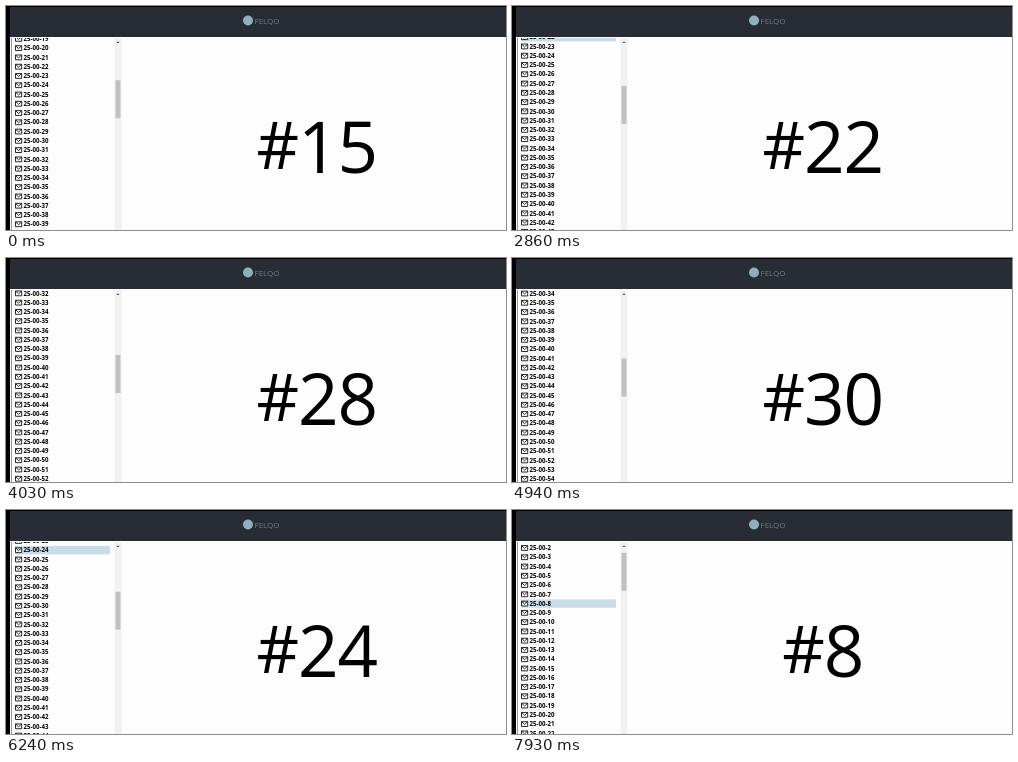
Recreate the animation shown at these times as an HTML page. Size 500 by 224 pixels, loop 8 s.

```html
<!DOCTYPE html>
<html lang="en">
<head>
<meta charset="utf-8">
<title>Numbered list browser</title>
<style>
  html, body { margin: 0; width: 100%; height: 100%; overflow: hidden; background: #000; }
  svg { display: block; width: 500px; height: 224px; }
  text { font-family: "Open Sans", "Noto Sans", sans-serif; }
  .row text { font-size: 6.1px; font-weight: 700; }
  .row path { fill: #fff; stroke: #111; stroke-width: .9; stroke-linejoin: round; }
  .big { font-size: 71px; letter-spacing: -1px; text-anchor: middle; }
  .hash { font-size: 66px; }
</style>
</head>
<body>
<svg viewBox="0 0 500 224">
  <defs>
    <clipPath id="pane"><rect x="4" y="32" width="104" height="192"/></clipPath>
  </defs>
  <rect width="500" height="224"/>
  <rect x="4" y="1" width="496" height="30" fill="#272c35"/>
  <circle cx="242" cy="14.5" r="5" fill="#8eb0ba"/>
  <text x="248.5" y="17.6" font-size="8" fill="#727b85">FELQO</text>

  <rect x="4" y="31" width="496" height="193" fill="#fdfdfd"/>
  <g clip-path="url(#pane)">
    <path d="M5.5 32V224" stroke="#a394a6"/>
    <g id="list">
      <path d="M5 33.5H106.5" stroke="#a394a6"/>
      <rect id="mark" x="9" width="95" height="8.4" fill="#c9dce9"/>
    </g>
  </g>

  <rect x="108.5" y="32" width="7" height="192" fill="#f1f1f1"/>
  <path d="M110.6 36.9L112 35.2L113.4 36.9Z" fill="#444"/>
  <rect id="thumb" x="109.5" width="5" height="38" fill="#c1c1c1"/>

  <text class="big" x="310.8" y="163"><tspan class="hash">#</tspan><tspan id="number" dy="4"></tspan></text>
</svg>
<script>
const LOOP = 8000, STEP = 130, PITCH = 9.27, FIRST_Y = 43, ROWS = 62;
const $ = id => document.getElementById(id);
const rowY = n => FIRST_Y + (n - 1) * PITCH;

for (let n = 1; n <= ROWS; n++) {
  $('list').insertAdjacentHTML('beforeend', `
    <g class="row" transform="translate(0 ${rowY(n)})">
      <path d="M9.5 -2.4H15.7V2.4H9.5ZL12.6 .5L15.7 -2.4"/>
      <text x="17.6" y="2.2">25-00-${n}</text>
    </g>`);
}

function draw(now) {
  const step = Math.floor((now % LOOP + 0.5) / STEP);
  const ramp = (from, to) => Math.min(1, Math.max(0, (step - from) / (to - from)));

  const climb = ramp(19, 31), jump = ramp(37, 38), rewind = ramp(47, 52);
  const scroll = 177 + 118 * climb + 18.4 * jump
    - 43.4 * ramp(38, 46) - 270 * rewind + 14.3 * ramp(59, 61);
  const number = Math.round(15 + 5 * ramp(13, 14) + 8 * climb + 2 * jump
    - 3 * ramp(38, 44) - 17 * rewind - ramp(52, 53) - ramp(56, 57));

  $('number').textContent = number;
  $('list').setAttribute('transform', `translate(0 ${-scroll})`);
  $('mark').setAttribute('y', rowY(number) - 4.2);
  $('mark').setAttribute('opacity', step === 14 ? 0.45 : 1);
  $('thumb').setAttribute('y', 40 + scroll * 0.193);
}

const start = performance.now();
function tick() {
  draw(performance.now() - start);
  requestAnimationFrame(tick);
}
tick();
</script>
</body>
</html>
```
